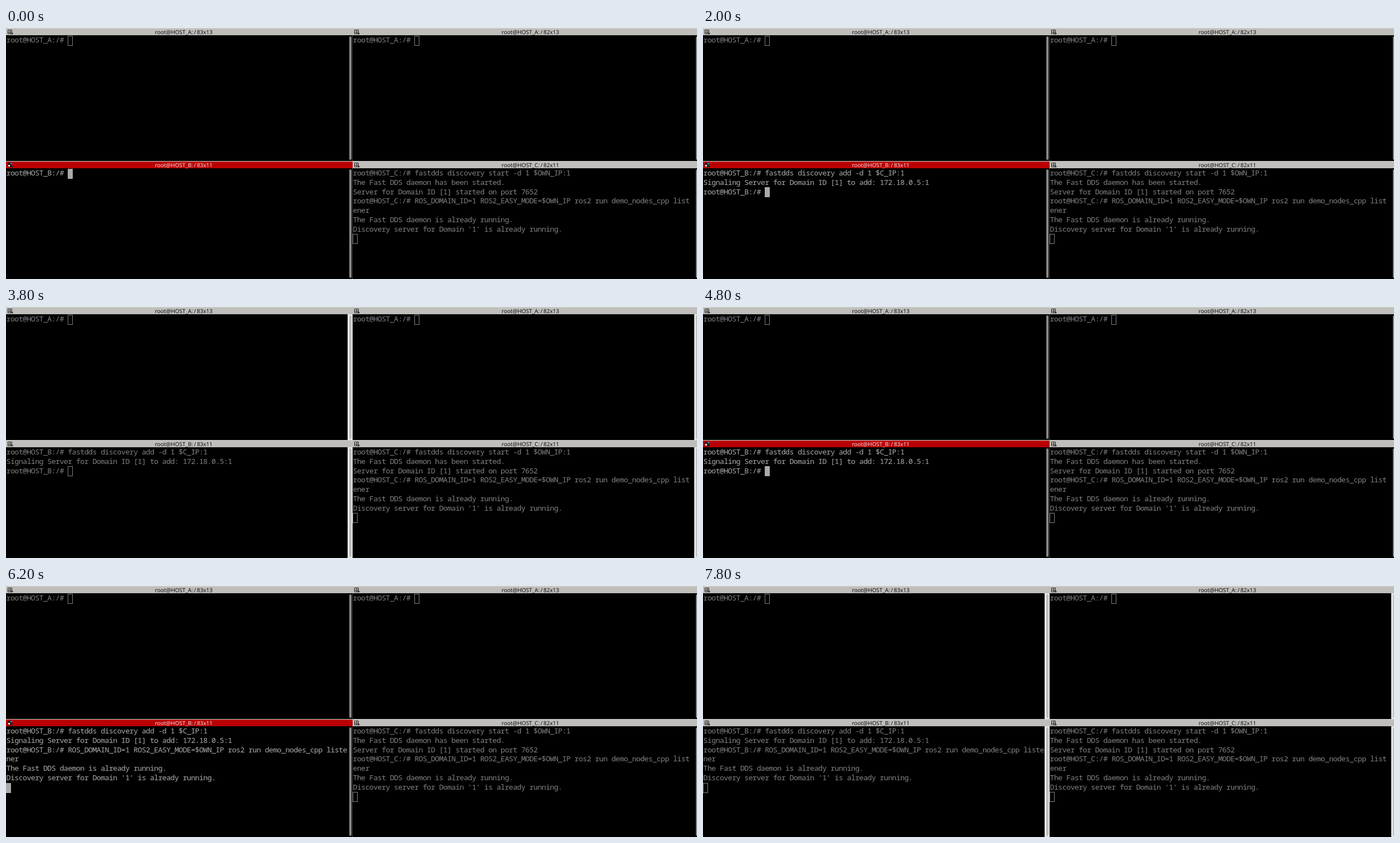
An HTML page for the animation above (8000 ms loop, 1242 px wide and 451 px high).

```html
<!DOCTYPE html>
<html lang="en">
<head>
<meta charset="utf-8">
<title>Four terminals</title>
<style>
  html, body { margin: 0; width: 100%; height: 100%; overflow: hidden; background: #000; }
  #stage { position: relative; width: 1242px; height: 451px; overflow: hidden; background: #000; }
  .pane, .bar, .text, .line, .cursor, .track, .thumb, .icon, .title, .split { position: absolute; }
  .bar { left: 0; right: 0; top: 0; height: 13px; background: #bfbebb; color: #111; box-shadow: inset 0 1px #d3d2cd; }
  .title { transform: translateX(-50%); top: 0; white-space: pre; word-spacing: -1px;
    font: 10px/14px "Noto Sans", "Open Sans", sans-serif; text-rendering: geometricPrecision; }
  .icon { left: 2px; top: 2px; width: 11px; height: 11px; }
  .text { left: .5px; color: #828282; font: 13.333px/16.83px "Noto Sans Mono", "DejaVu Sans Mono", monospace;
    letter-spacing: -.62px; white-space: pre; }
  .line { left: 0; height: 16.83px; margin-top: -.7px; }
  .cursor { box-sizing: border-box; width: 9px; height: 18px; border: 1px solid #828282; }
  .track { left: 614px; right: 0; top: 13px; bottom: 0; }
  .thumb { left: 3px; top: 2px; bottom: 2px; width: 4px; border-radius: 2px; background: #888; }
  .split { left: 622px; top: 13px; width: 1px; height: 438px; background: #444; }
  .active .bar { background: #b90003; color: #f3dede; }
  .active .text { color: #acacac; }
  .active .cursor { background: #aaa; border-color: #aaa; }
  .off .track { background: #bebebe; }
  .off .thumb { background: #bebebe; }
  .settled .track { background: #e6e6e6; }
  .icon .cells { fill: none; stroke: #222; }
  .icon .lit { display: none; }
  .active .icon .cells { stroke: #3a1012; fill: #3a1012; }
  .active .icon .lit { display: inline; }
</style>
</head>
<body>
<div id="stage"></div>
<script>
const LOOP = 8000, CELL = 7.38, ROW = 16.83;
const stage = document.getElementById('stage');

const prompt = host => `root@HOST_${host}:/# `;
const RUN = 'ROS_DOMAIN_ID=1 ROS2_EASY_MODE=$OWN_IP ros2 run demo_nodes_cpp listener';
const READY = "\nThe Fast DDS daemon is already running.\nDiscovery server for Domain '1' is already running.\n";
const ADD = prompt('B') + 'fastdds discovery add -d 1 $C_IP:1';
const ADDED = ADD + '\nSignaling Server for Domain ID [1] to add: 172.18.0.5:1\n';
const SERVER = prompt('C') + 'fastdds discovery start -d 1 $OWN_IP:1\n' +
  'The Fast DDS daemon has been started.\nServer for Domain ID [1] started on port 7652\n' +
  prompt('C') + RUN + READY;

// [start ms, content of the lower left terminal]
const typed = [
  [0, prompt('B')],
  [1000, ADD],
  [1800, ADDED],
  [2000, ADDED + prompt('B')],
  [5000, ADDED + prompt('B') + RUN],
  [5600, ADDED + prompt('B') + RUN + '\n'],
  [5800, ADDED + prompt('B') + RUN + READY]
];

// [start ms, window state]
const focus = [
  [0, 'on'], [3200, 'off'], [3800, 'off settled'],
  [4200, 'on'], [6800, 'off'], [7800, 'off settled']
];

const at = (steps, t) => steps.reduce((value, step) => t >= step[0] ? step[1] : value, steps[0][1]);

function add(parent, name, style = {}) {
  const el = document.createElement('div');
  el.className = name;
  Object.assign(el.style, style);
  parent.append(el);
  return el;
}

const ICON = `<svg class="icon" viewBox="0 0 11 11">
  <path class="cells" d="M1.5 1.5h7v7h-7zM5.5 1.5v7M1.5 5.5h7"/>
  <path d="M7 7h4l-2 3z" fill="#222"/>
  <g class="lit"><path d="M2 5h3v3H2z" fill="#eee"/><path d="M6 1h3v3H6z" fill="#2b7fb5"/>
  <path d="M6 5h3v3H6z" fill="#222"/></g></svg>`;

function makePane(x, y, w, h, host, cols, rows) {
  const el = add(stage, 'pane', { left: x + 'px', top: y + 'px', width: w + 'px', height: h + 'px' });
  const track = add(el, 'track');
  add(track, 'thumb');
  const bar = add(el, 'bar');
  bar.innerHTML = ICON;
  add(bar, 'title', { left: '319.5px' }).textContent = `root@HOST_${host}: / ${cols}x${rows}`;
  const text = add(el, 'text', { top: '13.6px' });
  return { el, text, cols, shown: null };
}

function write(pane, content) {
  if (pane.shown === content) return;
  pane.shown = content;
  const lines = content.split('\n').flatMap(s => {
    const parts = [];
    do { parts.push(s.slice(0, pane.cols)); s = s.slice(pane.cols); } while (s);
    return parts;
  });
  pane.text.replaceChildren();
  lines.forEach((s, i) => { add(pane.text, 'line', { top: i * ROW + 'px' }).textContent = s; });
  const end = lines.length - 1;
  add(pane.text, 'cursor', { left: lines[end].length * CELL - .2 + 'px', top: end * ROW + 'px' });
}

add(stage, 'split');
const topLeft = makePane(0, 0, 623, 239, 'A', 83, 13);
const topRight = makePane(623, 0, 619, 239, 'A', 82, 13);
const lowLeft = makePane(0, 239, 623, 212, 'B', 83, 11);
const lowRight = makePane(623, 239, 619, 212, 'C', 82, 11);
write(topLeft, prompt('A'));
write(topRight, prompt('A'));
write(lowRight, SERVER);

const start = performance.now();
function draw(now) {
  const t = Math.max(0, now - start) % LOOP;
  const state = at(focus, t);
  stage.className = state;
  lowLeft.el.classList.toggle('active', state === 'on');
  write(lowLeft, at(typed, t));
  requestAnimationFrame(draw);
}
draw(start);
</script>
</body>
</html>
```
